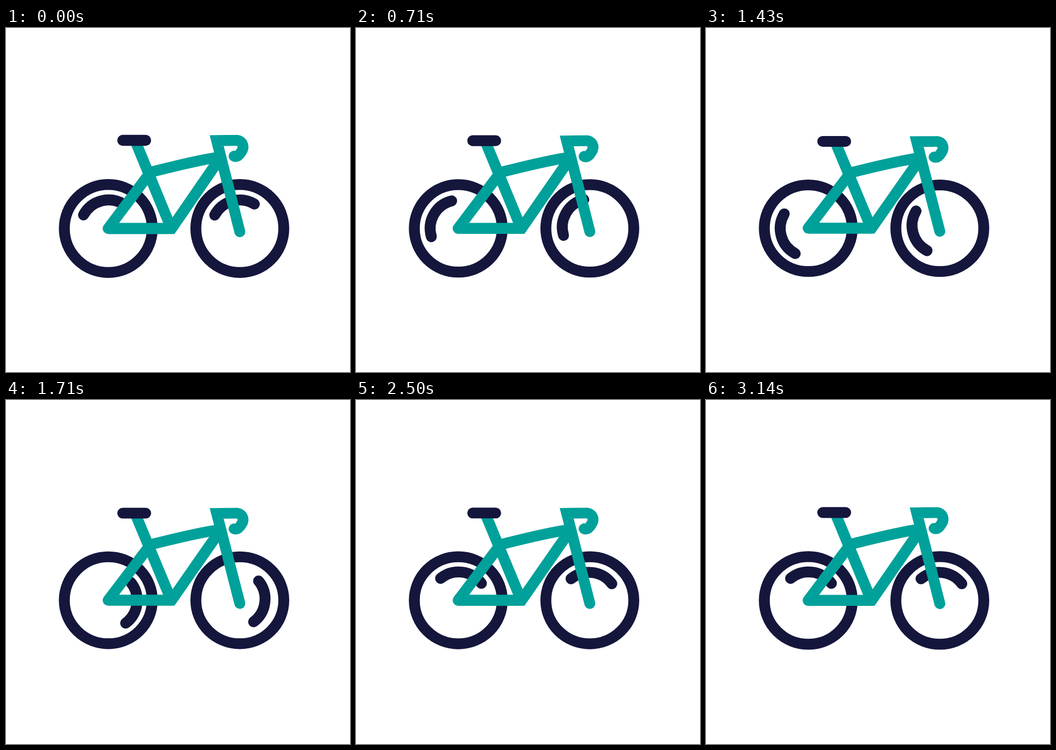
Write an HTML page that moves like this. It is 640 px wide and 640 px high and loops after 3.21 s.

```html
<!DOCTYPE html>
<html lang="en">
<head>
<meta charset="utf-8">
<title>Bicycle</title>
<style>
  html, body { margin: 0; width: 100%; height: 100%; overflow: hidden; background: #fff; }
  svg { display: block; width: 100vw; height: 100vh; }
  g { fill: none; stroke-width: 20.3; }
  .dark { stroke: #15163c; stroke-linecap: round; }
  .teal { stroke: #00a19a; }
  .round { stroke-linecap: round; }
</style>
</head>
<body>
<svg viewBox="0 0 640 640">
  <g class="dark body">
    <circle cx="190.3" cy="373" r="81.8"/>
    <circle cx="435" cy="373" r="81.8"/>
  </g>
  <g class="dark">
    <path id="rear" d="M144.2 347.8A53 53 0 0 1 218 327.4"/>
    <path id="front" d="M388.3 348A53 53 0 0 1 462.1 327.5"/>
  </g>
  <g class="teal body">
    <path d="M240 209L307.5 373"/>
    <path d="M263 276L190 373H308L399 241" stroke-linejoin="round"/>
    <path d="M190 373H308L399 241"/>
    <path d="M266 269Q360 245 398 240"/>
    <path class="round" d="M435 379L392 209.5L427 209C440 208.5 444.5 221 438 230C434.5 236 430 240.5 424.5 238.5"/>
  </g>
  <g class="dark body"><path d="M217.2 209H259.8"/></g>
</svg>
<script>
  const LOOP = 3210, FPS = 14, FRAMES = 45;
  const bodies = document.querySelectorAll('.body');
  const rear = document.getElementById('rear');
  const front = document.getElementById('front');

  // Linear move over `move` frames, then a short rest until `span` is over.
  const stroke = (frame, move, span) => {
    const count = Math.floor(frame / span);
    return { count, part: Math.min((frame - count * span) / move, 1) };
  };

  function draw(now) {
    const t = Math.floor((now % LOOP) / 10) * 10;
    const frame = Math.floor((t + 5) * FPS / 1000);

    const turn = stroke(frame, 4, FRAMES / 10);
    const angle = -180 * (turn.count + turn.part);
    rear.setAttribute('transform', `rotate(${angle} 191 372.8)`);
    front.setAttribute('transform', `rotate(${angle} 432.9 369.6)`);

    const bob = stroke(frame, 5, FRAMES / 8);
    const squash = bob.count % 2 ? 1 - bob.part : bob.part;
    const scale = 1 - 0.04 * squash;
    for (const b of bodies)
      b.setAttribute('transform', `translate(0 ${338 * (1 - scale)}) scale(1 ${scale})`);
  }

  let start;
  function tick(now) {
    start ??= now;
    draw(now - start);
    requestAnimationFrame(tick);
  }
  draw(0);
  requestAnimationFrame(tick);
</script>
</body>
</html>
```
